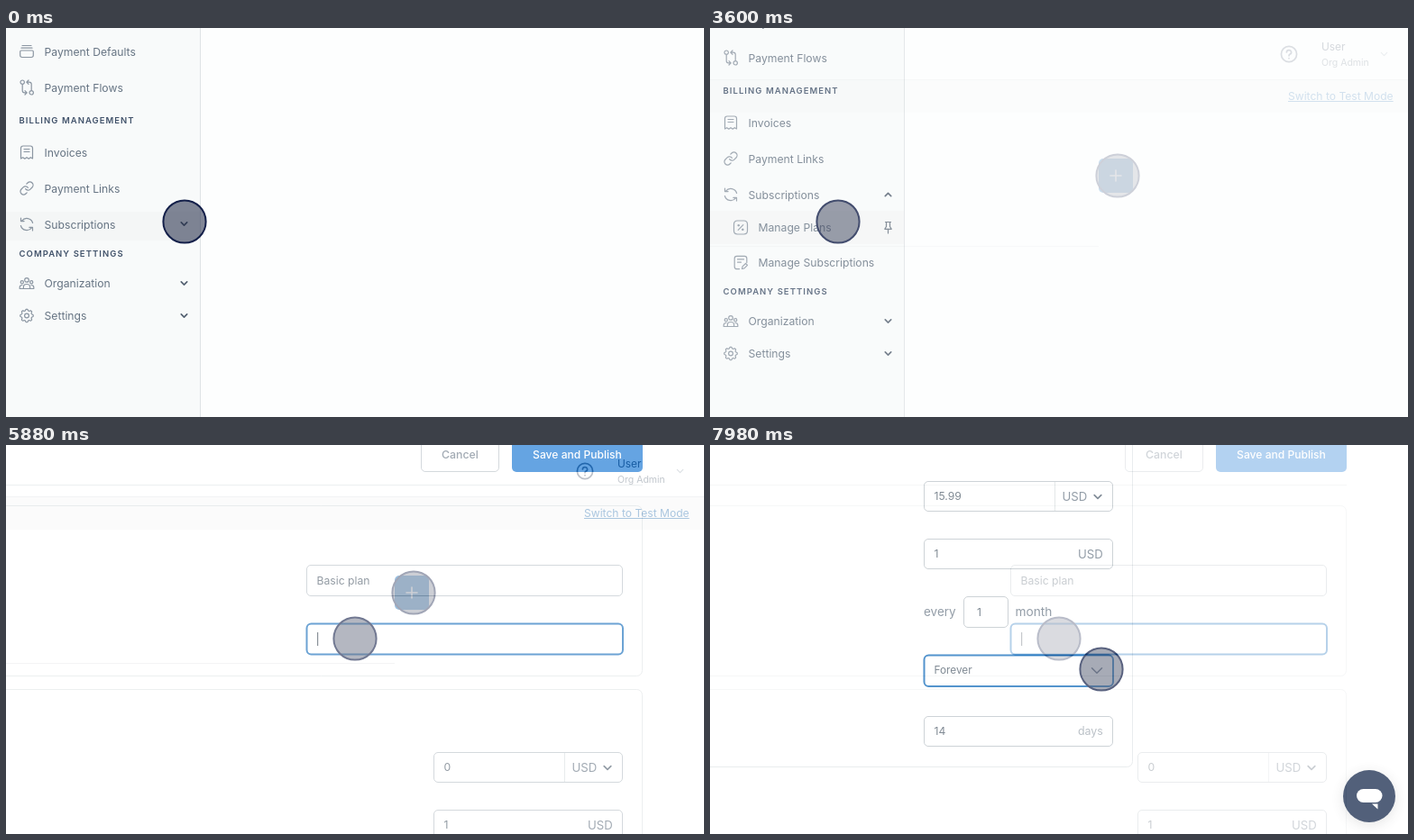
Write an HTML page with a canvas that moves like this. It is 774 px wide and 432 px high and loops after 8 s.

```html
<!DOCTYPE html>
<html lang="en">
<head>
<meta charset="utf-8">
<title>Creating a subscription plan</title>
<style>
html, body { margin: 0; width: 100%; height: 100%; overflow: hidden; background: #fff; }
canvas { display: block; width: 774px; height: 432px; }
</style>
</head>
<body>
<canvas id="stage"></canvas>
<script>
const W = 774, H = 432, LOOP = 8000;
const STEP = 60, STEPS = 10;
const FADES = [1500, 3540, 5580, 7620];

const SLATE = '#667483', INK = '#4c5a68', ICON = '#8b96a2';
const BORDER = '#b9c1c7', RULE = '#e1e5e7', FOCUS = '#0b67b9', NAVY = '#14204a';

const dot = (x, y, r) =>
  `M${x - r} ${y}a${r} ${r} 0 1 0 ${2 * r} 0a${r} ${r} 0 1 0 ${-2 * r} 0`;

function gearPath() {
  let d = dot(0, 0, 2.4);
  for (let i = 0; i <= 64; i++) {
    const a = i / 64 * Math.PI * 2;
    const r = 6.5 + 0.8 * Math.tanh(2 * Math.cos(8 * a));
    d += `${i ? 'L' : 'M'}${(r * Math.cos(a)).toFixed(2)} ${(r * Math.sin(a)).toFixed(2)}`;
  }
  return d + 'z';
}

// Icon outlines, centred on the origin
const ICONS = {
  stack: 'M-5-6.5h10M-6-3.8h12M-6-1h12q1.3 0 1.3 1.3v4q0 2.2-2.2 2.2h-10.2q-2.2 0-2.2-2.2v-4q0-1.3 1.3-1.3z',
  flow: dot(-4.8, -5.8, 2.2) + dot(5.2, 5.8, 2.2) +
    'M-4.8-3.6v7q0 2.4 2.4 2.4h2.4M-2 3.6l2.2 2.2-2.2 2.2M5.2 3.6v-7q0-2.4-2.4-2.4h-2.4M2-8l-2.2 2.2 2.2 2.2',
  receipt: 'M-6.5 7v-11.5q0-2.5 2.5-2.5h8q2.5 0 2.5 2.5v11.5l-2.2-1.3-2.1 1.5-2.2-1.5-2.2 1.5-2.1-1.5zM-3-3.5h6M-3-.5h6',
  link: 'M-1.4.7a3.5 3.5 0 0 0 5.3.4l2.1-2.1a3.5 3.5 0 0 0-5-5l-1.2 1.2M1.4-.7a3.5 3.5 0 0 0-5.3-.4l-2.1 2.1a3.5 3.5 0 0 0 5 5l1.2-1.2',
  cycle: 'M6.6-1.5a6.8 6.8 0 0 0-12-2.3M-6.6 1.5a6.8 6.8 0 0 0 12 2.3M-6.5-7v3.6h3.6M6.5 7v-3.6h-3.6',
  people: dot(0, -3.6, 2.3) + dot(-5.2, -1.2, 1.6) + dot(5.2, -1.2, 1.6) +
    'M-3.6 6v-2q0-3 3.6-3t3.6 3v2M-7.8 6v-1.6q0-2.4 2.8-2.4M7.8 6v-1.6q0-2.4-2.8-2.4M-7.8 6h15.6',
  gear: gearPath(),
  percent: 'M-3.5-7.5h7q4 0 4 4v7q0 4-4 4h-7q-4 0-4-4v-7q0-4 4-4zM-2.8 2.8l5.6-5.6' + dot(-2.3, -2.3, .7) + dot(2.3, 2.3, .7),
  edit: 'M-1.5 7.2h-2.5q-2.8 0-2.8-2.8v-9q0-2.6 2.6-2.6h8.4q2.6 0 2.6 2.6v4.6M-3.5-3.6h7M-3.5-.4h4M1.5 7l.5-2.6 3.6-3.4 1.9 1.9-3.5 3.5z',
  pin: 'M-3-6h6M-2-6v5l-1.7 2.8h7.4l-1.7-2.8v-5M0 1.8v4.7'
};

let g;

function text(s, x, y, size = 12.2, color = SLATE, weight = 400, align = 'left', gap = 0) {
  g.font = `${weight} ${size}px Inter, "DejaVu Sans", sans-serif`;
  g.letterSpacing = gap + 'px';
  g.textAlign = align;
  g.fillStyle = color;
  g.fillText(s, x, y);
}

function path(d, x, y, color = ICON, width = 1.2) {
  g.save();
  g.translate(x, y);
  g.strokeStyle = color;
  g.lineWidth = width;
  g.lineCap = g.lineJoin = 'round';
  g.stroke(new Path2D(d));
  g.restore();
}

function rect(x, y, w, h, color) {
  g.fillStyle = color;
  g.fillRect(x, y, w, h);
}

function box(x, y, right, bottom, r, stroke, width = 1, fill) {
  g.beginPath();
  g.roundRect(x, y, right - x, bottom - y, r);
  if (fill) { g.fillStyle = fill; g.fill(); }
  if (stroke) { g.strokeStyle = stroke; g.lineWidth = width; g.stroke(); }
}

function chevron(x, y, up = false, half = 3.2, color = '#556272', width = 1.7) {
  const h = up ? -half / 2 : half / 2;
  path(`M${-half} ${-h}L0 ${h}L${half} ${-h}`, x, y, color, width);
}

function pointer(x, y) {
  g.beginPath();
  g.arc(x, y, 23.6, 0, Math.PI * 2);
  g.fillStyle = 'rgba(18,28,58,.52)';
  g.fill();
  g.strokeStyle = NAVY;
  g.lineWidth = 2;
  g.stroke();
}

function item(icon, label, y, indent = 0) {
  path(ICONS[icon], 23 + indent, y);
  text(label, 42.5 + indent, y + 4.5);
}

const heading = (s, y) => text(s, 14.5, y + 3.5, 9.5, '#41526a', 600, 'left', 1.05);

function sidebar(rowY, rowH) {
  rect(0, 0, W, H, '#fdfefe');
  rect(0, 0, 215, H, '#f8fafa');
  rect(215, 0, 1, H, '#dfe3e5');
  rect(0, rowY, 215, rowH, '#f4f6f6');
}

function menu(top, company) {
  item('stack', 'Payment Defaults', top);
  item('flow', 'Payment Flows', top + 40);
  heading('BILLING MANAGEMENT', top + 76);
  item('receipt', 'Invoices', top + 112);
  item('link', 'Payment Links', top + 152);
  item('cycle', 'Subscriptions', top + 192);
  heading('COMPANY SETTINGS', company);
  item('people', 'Organization', company + 33.5);
  item('gear', 'Settings', company + 69.5);
  chevron(197.5, company + 33.5);
  chevron(197.5, company + 69.5);
}

function menuClosed() {
  sidebar(204, 32);
  menu(26, 250);
  chevron(197.5, 217.5);
  pointer(198, 215);
}

function menuOpen() {
  sidebar(203, 37);
  menu(-7, 292);
  chevron(197.5, 185, true);
  item('percent', 'Manage Plans', 221.5, 11);
  item('edit', 'Manage Subscriptions', 260.5, 11);
  path(ICONS.pin, 197.5, 221.5, '#66727f');
  pointer(142, 215);
}

function plans() {
  rect(0, 57, W, 1, '#dfe3e5');
  rect(0, 58, W, 36, '#f5f7f7');
  path(dot(0, 0, 8.6), 642, 29, '#59657a', 1.7);
  path('M-2.6-2a2.6 2.4 0 1 1 3.8 2.1q-1.2.6-1.2 1.7M0 4.6v.1', 642, 29, '#59657a', 1.7);
  text('User', 678, 25, 11.9, '#3b4960');
  text('Org Admin', 678, 41.5, 10.5);
  chevron(747.5, 29, false, 3.2, '#a9b3bd', 1.2);

  const label = 'Switch to Test Mode';
  text(label, 641, 80, 12.1, '#2a70b0');
  rect(641, 81, g.measureText(label).width, 1, '#2a70b0');

  rect(0, 242, 431, 1, '#e1e4e6');
  box(431, 145, 469, 183, 5, null, 0, '#0061b4');
  path('M-6 0h12M0-6v12', 450, 164, '#fff', 1.6);
  pointer(452, 164);
}

function field(x, y, right, bottom, value, unit, unitX) {
  box(x + .5, y + .5, right - .5, bottom - .5, 4.5, BORDER);
  const base = (y + bottom) / 2 + 4.3;
  text(value, x + 11.5, base - .3, 12.2, INK);
  if (unit) text(unit, unitX, base + .2, 13.2, SLATE);
}

function currency(x, y, value) {
  field(x, y, x + 210, y + 34, value, 'USD', x + 153.5);
  rect(x + 145, y + 1, 1, 32, '#d9dee1');
  chevron(x + 193, y + 17.5, false, 3.8, '#4e5d6d', 1.7);
}

const focusBox = (x, y, right, bottom) => box(x, y, right, bottom, 5, FOCUS, 2);

function planForm() {
  box(460.5, -10, 546.5, 29.5, 4.5, BORDER);
  text('Cancel', 503.5, 15.2, 12.3, SLATE, 500, 'center');
  box(561, -10, 706, 30, 5, null, 0, '#0069d0');
  text('Save and Publish', 633.5, 15.2, 12.1, '#fff', 500, 'center');
  rect(0, 44, 706, 1, RULE);
  box(-20, 67.5, 705.5, 256.5, 6, RULE);
  box(-20, 271.5, 705.5, 460, 6, RULE);

  field(333, 133, 684, 168, 'Basic plan');
  focusBox(333.5, 198.5, 684, 232.5);
  rect(345, 208, 1.2, 15, '#3e4954');
  currency(474, 341, '0');
  field(474, 405, 684, 439, '1', 'USD', 645);
  pointer(387, 215);
}

function chatButton() {
  g.save();
  g.shadowColor = 'rgba(0,0,0,.14)';
  g.shadowBlur = 14;
  g.shadowOffsetY = 3;
  g.fillStyle = '#0a1e43';
  g.beginPath();
  g.arc(731, 390, 29, 0, Math.PI * 2);
  g.fill();
  g.restore();
  box(717, 382, 745.5, 397, 7.5, null, 0, '#fff');
  g.fill(new Path2D('M734 398.5h6.5v6z'));
}

function priceForm() {
  box(-20, -20, 468.5, 357.5, 6, RULE);
  currency(237, 40, '15.99');
  field(237, 104, 447, 138, '1', 'USD', 408);
  text('every', 237, 190, 13.5);
  box(281.5, 168.5, 330.5, 202.5, 4.5, BORDER);
  text('1', 296, 190, 12.2, INK);
  text('month', 338.5, 190, 13.7);
  focusBox(237.5, 233.5, 447, 268);
  text('Forever', 248.5, 254.3, 11.8, INK);
  chevron(429, 250.5, false, 5.5, '#4e6078', 1.5);
  field(237, 301, 447, 335, '14');
  text('days', 408, 322, 12.4, '#9fa8b1');
  chatButton();
  pointer(434, 249);
}

const dpr = window.devicePixelRatio || 1;

function setup(canvas) {
  canvas.width = W * dpr;
  canvas.height = H * dpr;
  const c = canvas.getContext('2d');
  c.scale(dpr, dpr);
  return c;
}

const scenes = [menuClosed, menuOpen, plans, planForm, priceForm].map(draw => {
  const layer = document.createElement('canvas');
  g = setup(layer);
  rect(0, 0, W, H, '#fff');
  draw();
  return layer;
});

const stage = setup(document.getElementById('stage'));

function show(layer, alpha) {
  stage.globalAlpha = alpha;
  stage.drawImage(layer, 0, 0, W, H);
}

function render(t) {
  let i = 0, mix = 1;
  FADES.forEach((start, n) => {
    if (t < start) return;
    i = n + 1;
    mix = Math.min(1, (Math.floor((t - start) / STEP) + 1) / STEPS);
  });
  if (mix < 1) show(scenes[i - 1], 1);
  show(scenes[i], mix);
}

const begin = performance.now();
function tick() {
  render((performance.now() - begin) % LOOP);
  requestAnimationFrame(tick);
}
render(0);
requestAnimationFrame(tick);
</script>
</body>
</html>
```
